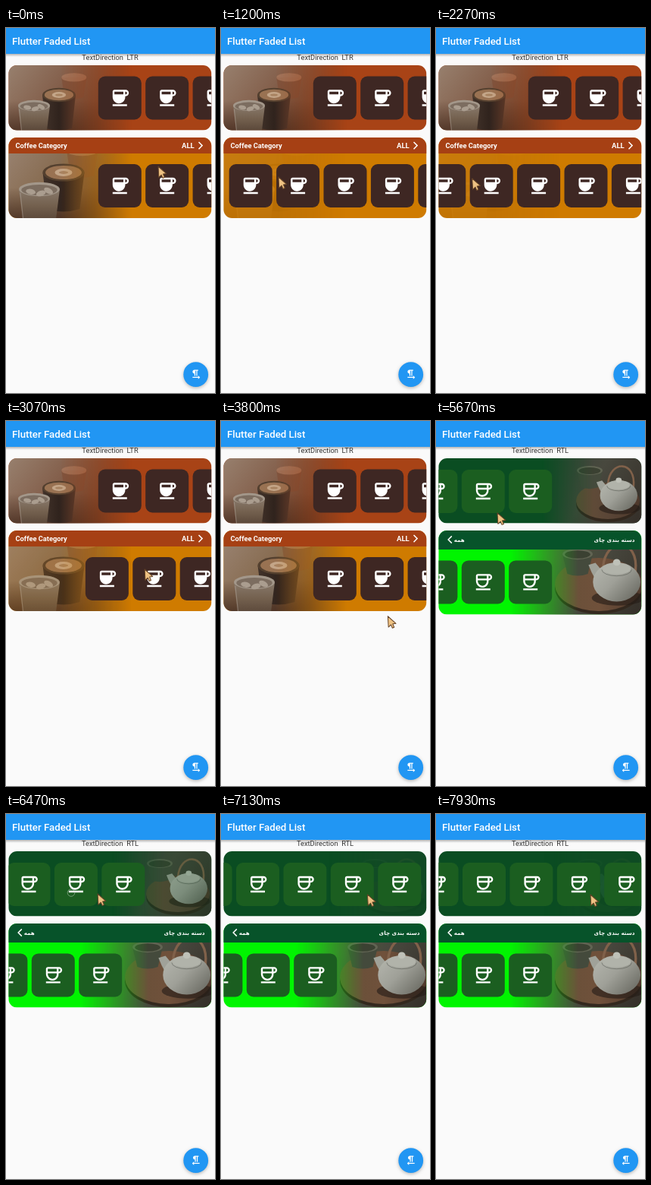
Animation, 276 px wide and 480 px high, one loop 8000 ms. Source, as an HTML page with a canvas:

```html
<!DOCTYPE html>
<html lang="en">
<head>
<meta charset="utf-8">
<title>Faded list</title>
<style>
html, body { margin: 0; width: 100%; height: 100%; overflow: hidden; background: #fafafa; }
canvas { display: block; width: 276px; height: 480px; }
</style>
</head>
<body>
<canvas id="stage"></canvas>
<script>
const W = 276, H = 480, LOOP = 8000, FLIP = 4800;
const LEFT = 3.5, RIGHT = 271.2, TILE = 57, PITCH = 62.4;
const SCALE = Math.max(1, window.devicePixelRatio || 1);
const BLUE = '#2196f3';

const CUP = 'M18.5 3H6c-1.1 0-2 .9-2 2v5.71c0 3.83 2.95 7.18 6.78 7.29 3.96.12 7.22-3.06 7.22-7v-1h.5c1.93 0 3.5-1.57 3.5-3.5S20.43 3 18.5 3zM16 5v3H6V5h10zM18.5 8H18V5h.5c.83 0 1.5.67 1.5 1.5S19.33 8 18.5 8zM4 19h16v2H4z';
const ICONS = {
  coffee: new Path2D(CUP),
  tea: new Path2D(CUP + 'M10.83 15.99C8.11 15.9 6 13.43 6 10.71V10h10v1c0 2.8-2.33 5.09-5.17 4.99z'),
  ltr: new Path2D('M9 10v5h2V4h2v11h2V4h2V2H9C6.79 2 5 3.79 5 6s1.79 4 4 4zm12 8l-4-4v3H5v2h12v3l4-4z'),
  rtl: new Path2D('M10 10v5h2V4h2v11h2V4h2V2h-8C7.79 2 6 3.79 6 6s1.79 4 4 4zm-2 7v-3l-4 4 4 4v-3h12v-2H8z')
};

// Keys are [time, value...]
const POINTER = [
  [0, 201, 182], [250, 188, 194], [1200, 76, 196], [1600, 42, 197], [2200, 45, 198],
  [3070, 183, 195], [3400, 203, 196], [3700, 214, 230], [4350, 258, 458], [4600, 258, 462],
  [4950, 258, 462], [5670, 81, 121], [6100, 86, 104], [6470, 121, 105], [7250, 198, 106], [8000, 204, 106]
];
const COFFEE_SCROLL = [[0, 0], [250, 0], [1200, 111], [1600, 145], [2200, 142], [3070, 17], [3350, 0], [8000, 0]];
const TEA_SCROLL = [[0, 0], [6120, 0], [6470, 30], [7250, 117], [7930, 126], [8000, 126]];

function makeCanvas() {
  return fit(document.createElement('canvas'));
}

function fit(c) {
  c.width = W * SCALE;
  c.height = H * SCALE;
  const g = c.getContext('2d');
  g.scale(SCALE, SCALE);
  return g;
}

const ctx = fit(document.getElementById('stage'));

// Monotone cubic interpolation through the keys
function sample(keys, t, k = 1) {
  const slope = i => (keys[i + 1][k] - keys[i][k]) / (keys[i + 1][0] - keys[i][0]);
  const tangent = i => {
    if (i === 0 || i === keys.length - 1) return 0;
    const a = slope(i - 1), b = slope(i);
    return a * b <= 0 ? 0 : 2 * a * b / (a + b);
  };
  let i = 0;
  while (i < keys.length - 2 && t >= keys[i + 1][0]) i++;
  const d = keys[i + 1][0] - keys[i][0];
  const u = (t - keys[i][0]) / d, v = 1 - u;
  return keys[i][k] * (1 + 2 * u) * v * v + tangent(i) * d * u * v * v
    + keys[i + 1][k] * u * u * (3 - 2 * u) - tangent(i + 1) * d * u * u * v;
}

function gradient(g, x0, y0, x1, y1, ...stops) {
  const fill = g.createLinearGradient(x0, y0, x1, y1);
  stops.forEach((c, i) => fill.addColorStop(i / (stops.length - 1), c));
  return fill;
}

function ellipse(g, x, y, rx, ry, fill, turn = 0) {
  g.fillStyle = fill;
  g.beginPath();
  g.ellipse(x, y, rx, ry, turn, 0, Math.PI * 2);
  g.fill();
}

function roundRect(g, x, y, w, h, r) {
  g.beginPath();
  g.roundRect(x, y, w, h, r);
}

function icon(path, cx, cy, size) {
  ctx.save();
  ctx.translate(cx - size / 2, cy - size / 2);
  ctx.scale(size / 24, size / 24);
  ctx.fillStyle = '#fff';
  ctx.fill(path, 'evenodd');
  ctx.restore();
}

function text(str, x, y, font, fill, align = 'left', dir = 'ltr') {
  ctx.font = font;
  ctx.fillStyle = fill;
  ctx.textAlign = align;
  ctx.direction = dir;
  ctx.fillText(str, x, y);
}

function chevron(x, y, dir) {
  ctx.strokeStyle = '#fff';
  ctx.lineWidth = 1.5;
  ctx.beginPath();
  ctx.moveTo(x - 2.3 * dir, y - 4.6);
  ctx.lineTo(x + 2.3 * dir, y);
  ctx.lineTo(x - 2.3 * dir, y + 4.6);
  ctx.stroke();
}

function vessel(g, x, y, r, h, taper, fill) {
  g.fillStyle = fill;
  g.beginPath();
  g.moveTo(x - r, y);
  g.lineTo(x + r, y);
  g.lineTo(x + r * taper, y + h);
  g.quadraticCurveTo(x, y + h + r * 0.25, x - r * taper, y + h);
  g.fill();
}

// A soft picture whose opacity runs from solid at x0 to nothing at x1
function photo(x0, x1, paint) {
  const g = makeCanvas();
  g.lineCap = 'round';
  paint(g);
  g.globalCompositeOperation = 'destination-in';
  g.fillStyle = gradient(g, x0, 0, x1, 0, '#000', 'rgba(0,0,0,.55)', 'rgba(0,0,0,0)');
  g.fillRect(0, 0, W, H);
  return g.canvas;
}

function coffeePhoto(top, bottom, cup, glass, tint) {
  return photo(72, 166, g => {
    g.fillStyle = gradient(g, 0, top, 110, bottom, '#98816f', tint, '#5e4030');
    g.fillRect(0, top, W, bottom - top);
    g.fillStyle = gradient(g, 0, bottom - 40, 0, bottom, 'rgba(70,45,32,0)', 'rgba(70,45,32,.8)');
    g.fillRect(0, top, W, bottom - top);

    const bx = cup.x + cup.r * 0.9, by = cup.y - cup.r * 1.05;
    vessel(g, bx, by, cup.r * 0.75, cup.r * 1.2, 0.75, 'rgba(125,75,52,.55)');
    ellipse(g, bx, by, cup.r * 0.75, cup.r * 0.26, 'rgba(178,130,102,.6)');

    vessel(g, cup.x, cup.y, cup.r, cup.h, 0.78, gradient(g, cup.x - cup.r, 0, cup.x + cup.r, 0, '#42332a', '#30231d', '#49342a'));
    ellipse(g, cup.x, cup.y, cup.r, cup.r * 0.42, '#54402f');
    ellipse(g, cup.x, cup.y, cup.r * 0.87, cup.r * 0.33, '#997252');
    ellipse(g, cup.x, cup.y, cup.r * 0.42, cup.r * 0.18, '#c3a588');
    ellipse(g, cup.x, cup.y, cup.r * 0.22, cup.r * 0.07, '#a78260');

    vessel(g, glass.x, glass.y, glass.r, glass.h, 0.8, gradient(g, 0, glass.y, 0, glass.y + glass.h, '#88796b', '#74614f', '#594638'));
    ellipse(g, glass.x, glass.y, glass.r, glass.r * 0.34, '#a3978a');
    ellipse(g, glass.x, glass.y + 1, glass.r * 0.88, glass.r * 0.26, '#7c6d60');
    for (const [dx, dy, a] of [[-0.42, 0.12, 0.2], [0.08, 0.2, -0.3], [0.45, 0.08, 0.5]]) {
      ellipse(g, glass.x + dx * glass.r, glass.y + dy * glass.r, glass.r * 0.24, glass.r * 0.13, '#aa9d8f', a);
    }
    g.strokeStyle = 'rgba(205,195,185,.35)';
    g.lineWidth = 1.2;
    g.beginPath();
    g.moveTo(glass.x - glass.r * 0.93, glass.y + 5);
    g.lineTo(glass.x - glass.r * 0.78, glass.y + glass.h);
    g.stroke();
  });
}

function teaPhoto(top, bottom, fade, cup, pot, board, tone) {
  return photo(fade[1], fade[0], g => {
    g.fillStyle = gradient(g, 130, top, 272, bottom, tone, '#48483e', '#342e28');
    g.fillRect(0, top, W, bottom - top);
    ellipse(g, board.x, board.y + 4, board.rx, board.ry, '#33281e');
    ellipse(g, board.x, board.y, board.rx, board.ry, gradient(g, board.x - board.rx, 0, board.x + board.rx, 0, '#665038', board.fill, '#4e382b'));

    vessel(g, cup.x, cup.y, cup.r, cup.r * 1.3, 0.68, '#444a3c');
    ellipse(g, cup.x, cup.y, cup.r, cup.r * 0.36, '#616453');
    ellipse(g, cup.x, cup.y + 0.5, cup.r * 0.84, cup.r * 0.26, '#3b4132');

    const { x, y, r } = pot;
    ellipse(g, x + r * 0.1, y + r * 0.72, r * 1.05, r * 0.3, 'rgba(35,28,22,.6)');
    g.strokeStyle = '#80614a';
    g.lineWidth = r * 0.1;
    g.beginPath();
    g.moveTo(x - r * 0.5, y - r * 0.5);
    g.bezierCurveTo(x - r * 0.4, y - r * 1.75, x + r * 0.95, y - r * 1.7, x + r * 0.8, y - r * 0.35);
    g.stroke();
    g.fillStyle = '#a0a299';
    g.beginPath();
    g.moveTo(x - r * 0.5, y + r * 0.4);
    g.quadraticCurveTo(x - r * 0.85, y, x - r * 1.08, y - r * 0.6);
    g.lineTo(x - r * 0.8, y - r * 0.68);
    g.lineTo(x - r * 0.4, y - r * 0.2);
    g.fill();
    ellipse(g, x + r * 0.05, y + r * 0.08, r * 0.95, r * 0.78, gradient(g, x - r, y - r, x + r, y + r, '#bcbeb5', '#9fa098', '#5d5d55'));
    ellipse(g, x + r * 0.05, y - r * 0.45, r * 0.56, r * 0.23, '#b1b3aa');
    ellipse(g, x + r * 0.05, y - r * 0.7, r * 0.15, r * 0.13, '#bfc1b8');
    g.strokeStyle = 'rgba(85,88,80,.6)';
    g.lineWidth = 0.9;
    g.beginPath();
    g.ellipse(x + r * 0.05, y - r * 0.4, r * 0.6, r * 0.24, 0, 0, Math.PI);
    g.stroke();
  });
}

const COFFEE = {
  dir: 1, start: 121.8, icon: ICONS.coffee, tile: '#3e2723',
  cards: [
    {
      top: 49, bottom: 134.5, body: '#a84316', tileY: 63.5,
      photo: coffeePhoto(49, 135, { x: 70, y: 88, r: 22, h: 44 }, { x: 37, y: 102, r: 21, h: 34 }, '#84604c')
    },
    {
      top: 144, bottom: 250, body: '#cf7b00', tileY: 179, split: 165, head: '#a64014',
      photo: coffeePhoto(165, 250, { x: 76, y: 190, r: 27.5, h: 48 }, { x: 44, y: 212, r: 27, h: 42 }, '#866a4e')
    }
  ]
};

const TEA = {
  dir: -1, start: 96.2, icon: ICONS.tea, tile: '#1b5e20',
  cards: [
    {
      top: 49, bottom: 134.5, body: '#0a4d22', tileY: 64,
      photo: teaPhoto(49, 135, [140, 208], { x: 203, y: 65, r: 17 }, { x: 240, y: 96, r: 26 }, { x: 227, y: 105, rx: 42, ry: 24, fill: '#5a4637' }, '#2f4434')
    },
    {
      top: 144, bottom: 254.5, body: '#00f500', tileY: 183.4, split: 169, head: '#07532a',
      photo: teaPhoto(169, 255, [98, 188], { x: 187, y: 175, r: 20 }, { x: 237, y: 209, r: 33 }, { x: 215, y: 215, rx: 58, ry: 35, fill: '#70513b' }, '#52633c')
    }
  ]
};

function header(theme) {
  if (theme.dir > 0) {
    text('Coffee Category', 12.5, 158, '700 9.3px Roboto, sans-serif', '#fff');
    text('ALL', 232, 158, '700 9.5px Roboto, sans-serif', '#fff');
    chevron(256.8, 154.6, 1);
  } else {
    const font = '700 7.2px "DejaVu Sans", sans-serif';
    text('دسته بندی چای', 262.5, 158.6, font, '#fff', 'right', 'rtl');
    text('همه', 37.8, 158.6, font, '#fff', 'right', 'rtl');
    chevron(18.5, 156, -1);
  }
}

function drawCard(theme, card, scroll) {
  ctx.save();
  roundRect(ctx, LEFT, card.top, RIGHT - LEFT, card.bottom - card.top, 11);
  ctx.clip();
  ctx.fillStyle = card.body;
  ctx.fillRect(0, card.top, W, card.bottom - card.top);
  ctx.globalAlpha = Math.max(0.1, 1 - scroll / 130);
  ctx.drawImage(card.photo, 0, 0, W, H);
  ctx.globalAlpha = 1;
  if (card.split) {
    ctx.fillStyle = card.head;
    ctx.fillRect(0, card.top, W, card.split - card.top);
    header(theme);
  }
  for (let i = 0; i < 10; i++) {
    const x = theme.start + theme.dir * (i * PITCH - scroll);
    if (x > W || x + TILE < 0) continue;
    ctx.fillStyle = theme.tile;
    roundRect(ctx, x, card.tileY, TILE, TILE, 9);
    ctx.fill();
    icon(theme.icon, x + TILE / 2, card.tileY + TILE / 2, 28.5);
  }
  ctx.restore();
}

function drawChrome(rtl) {
  text('TextDirection  ' + (rtl ? 'RTL' : 'LTR'), 137.5, 42.3, '400 9.3px Roboto, sans-serif', '#333', 'center');
  ctx.fillStyle = gradient(ctx, 0, 34, 0, 38, 'rgba(0,0,0,.28)', 'rgba(0,0,0,0)');
  ctx.fillRect(0, 34, W, 4);
  ctx.fillStyle = BLUE;
  ctx.fillRect(0, 0, W, 34);
  text('Flutter Faded List', 8, 22, '500 13.25px Roboto, sans-serif', '#fff');

  ctx.save();
  ctx.shadowColor = 'rgba(0,0,0,.27)';
  ctx.shadowBlur = 4 * SCALE;
  ctx.shadowOffsetY = 1.5 * SCALE;
  ellipse(ctx, 250.7, 455.7, 16.4, 16.4, BLUE);
  ctx.restore();
  icon(rtl ? ICONS.rtl : ICONS.ltr, 250.7, 455.7, 14.8);
}

function drawPointer(x, y) {
  ctx.save();
  ctx.translate(x, y);
  ctx.scale(1.08, 1.12);
  ctx.beginPath();
  ctx.moveTo(0, 0);
  ctx.lineTo(10, 8.5);
  ctx.lineTo(6, 9);
  ctx.lineTo(7.8, 13);
  ctx.lineTo(5.6, 13.8);
  ctx.lineTo(3.9, 10);
  ctx.lineTo(0.8, 12.8);
  ctx.closePath();
  ctx.fillStyle = '#eec283';
  ctx.fill();
  ctx.strokeStyle = '#654327';
  ctx.lineWidth = 0.9;
  ctx.lineJoin = 'round';
  ctx.stroke();
  ctx.restore();
}

function draw(t) {
  const rtl = t >= FLIP;
  const theme = rtl ? TEA : COFFEE;
  const scroll = sample(rtl ? TEA_SCROLL : COFFEE_SCROLL, t);
  const moving = rtl ? 0 : 1;
  ctx.fillStyle = '#fafafa';
  ctx.fillRect(0, 0, W, H);
  theme.cards.forEach((card, i) => drawCard(theme, card, i === moving ? scroll : 0));
  drawChrome(rtl);
  // Press ring left where the drag begins
  if (t > 6120 && t < 6540) {
    ctx.strokeStyle = 'rgba(190,205,190,.65)';
    ctx.lineWidth = 0.8;
    ctx.beginPath();
    ctx.arc(86, 103.5, 4.8, 0, Math.PI * 2);
    ctx.stroke();
  }
  drawPointer(sample(POINTER, t, 1), sample(POINTER, t, 2));
}

const began = performance.now();
function tick() {
  draw((performance.now() - began) % LOOP);
  requestAnimationFrame(tick);
}
tick();
</script>
</body>
</html>
```
